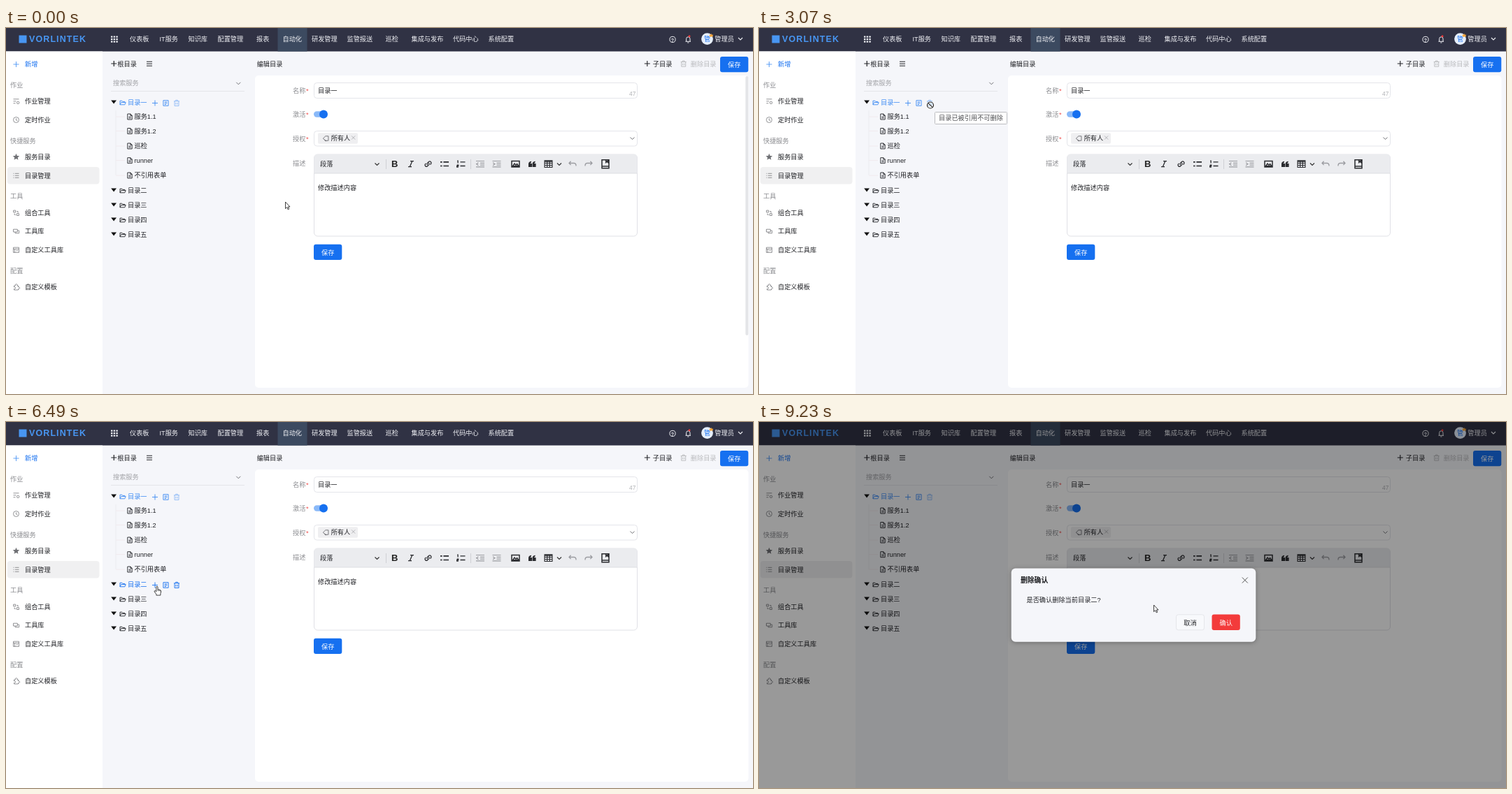
An HTML page for the animation above (9.31 s loop, 1068x524 px).

```html
<!DOCTYPE html>
<html lang="zh-CN">
<head>
<meta charset="utf-8">
<title>目录管理</title>
<style>
  html, body { margin: 0; width: 100%; height: 100%; overflow: hidden; background: #f5f6fa; }
  svg { display: block; width: 100%; height: 100%; }
  text { font: 9.2px 'Liberation Sans', 'Noto Sans CJK SC', 'Noto Sans CJK', sans-serif; fill: currentColor; }
</style>
</head>
<body>
<svg id="stage" viewBox="0 0 1068 524" xmlns="http://www.w3.org/2000/svg"></svg>
<script>
const LOOP = 9310, STEP = 76;
const BLUE = '#1670f0', INK = '#212226', GREY = '#8b8c90', PALE = '#b9babd';

// ---------- drawing helpers (all return markup) ----------
const text = (x, cy, s, color = 'currentColor', more = '') =>
  `<text x="${x}" y="${cy + 3.4}" style="fill:${color};${more}">${s}</text>`;
const rect = (x, y, w, h, fill, r = 0, stroke = 'none') =>
  `<rect x="${x}" y="${y}" width="${w}" height="${h}" rx="${r}" fill="${fill}" stroke="${stroke}"/>`;
const circle = (x, y, r, fill) => `<circle cx="${x}" cy="${y}" r="${r}" fill="${fill}"/>`;
const line = (d, color = 'currentColor', w = 1) =>
  `<path d="${d}" fill="none" stroke="${color}" stroke-width="${w}"/>`;
const icon = (name, x, y, color = 'currentColor', w = .9) =>
  `<g transform="translate(${x} ${y})">${line(ICONS[name], color, w)}</g>`;
const button = (x, y, w, h, label, fill, color = '#fff', stroke) =>
  rect(x, y, w, h, fill, 3, stroke) + text(x + w / 2, y + h / 2 + .4, label, color, 'text-anchor:middle');

// every icon is centred on 0,0
const ICONS = {
  plus: 'M-4 0H4M0-4V4',
  chevron: 'M-3-1.5L0 1.5L3-1.5',
  cross: 'M-4-4L4 4M4-4L-4 4',
  menu: 'M-4-3H4M-4 0H4M-4 3H4',
  trash: 'M-4-2.7H4M-1.4-2.7V-4.2H1.4V-2.7M-3-2.7V4H3V-2.7M-1.1-.6V2.2M1.1-.6V2.2',
  edit: 'M-3.6-3.8H3.6V3.8H-3.6ZM-1.8-1.6H1.8M-1.8 .2H1.8M-1.8 2H.6',
  folder: 'M-4 2.8V-2.8H-1.2L-.2-1.6H2.8V-.4M-4 2.8L-2.4-.4H4.2L2.8 2.8Z',
  file: 'M-3.2-4H1L3.2-1.8V4H-3.2ZM.8-4V-1.6H3.2M-1.5 .2H1.6M-1.5 2H1.6',
  job: 'M-4-3.2H4M-4-.2H0M-4 2.8H-1M1 1.9A1.7 1.7 0 1 0 4.4 1.9A1.7 1.7 0 1 0 1 1.9',
  clock: 'M-4 0A4 4 0 1 0 4 0A4 4 0 1 0-4 0M0-2.2V.4L1.8 1.4',
  list: 'M-4-3H-3M-1.6-3H4M-4 0H-3M-1.6 0H4M-4 3H-3M-1.6 3H4',
  combo: 'M-3.8-3.6H-.8V-.8H-3.8ZM1 1H4V3.8H1ZM.8-2.2H2.6V0M-2.4 .8V2.6H-.4',
  stack: 'M-4-2.8H1.8V1H-4ZM-1.4 1V2.8H4.2V-1H1.8',
  custom: 'M-4-3.6H4V3.6H-4ZM-4-1.4H4M-2-1.4V3.6M0 1H2.6',
  puzzle: 'M-3-2H-1A1.5 1.5 0 1 1 1.4-2H3V0A1.4 1.4 0 1 1 3 2.4V4H-3V2.4A1.4 1.4 0 1 0-3 0Z',
  tag: 'M-4 .2L-.5-3.2H3.6V3.2H-.5ZM-1.5 1.8L-1 3.6H1',
  italic: 'M-1-4H4M-4 4H1M1.7-4L-1.7 4',
  link: 'M-.8 1.6A2.2 2.2 0 0 1-.8-1.4L1.2-3.4A2.2 2.2 0 0 1 4.2-.4L3 .8M.8-1.6A2.2 2.2 0 0 1 .8 1.4L-1.2 3.4A2.2 2.2 0 0 1-4.2 .4L-3-.8',
  bullets: 'M-6-2.8H-3.4M-1.6-2.8H6M-6 2.8H-3.4M-1.6 2.8H6',
  numbers: 'M-5.4-4.6H-4.4V-1.2M-5.8 1.4H-3.8V2.8H-5.8V4.4H-3.6M-1-2.8H6M-1 2.8H6',
  outdent: 'M-6-4.2H6M0-1.4H6M0 1.4H6M-6 4.2H6M-2.6-2L-5.4 0L-2.6 2',
  indent: 'M-6-4.2H6M0-1.4H6M0 1.4H6M-6 4.2H6M-5.4-2L-2.6 0L-5.4 2',
  image: 'M-5.5-4.2H5.5V4.2H-5.5ZM-4 3L-1.5-.5L.6 1.6L2.2 0L4.4 3Z',
  table: 'M-5.4-4.8H5.4V4.8H-5.4ZM-5.4-3.6H5.4M-5.4-1.2H5.4M-5.4 1.8H5.4M-1.8-3.6V4.8M1.8-3.6V4.8',
  undo: 'M-2.4-4L-5-1.2L-2.4 1.4M-5-1.2H2.2Q5.2-1 5 2.8',
  redo: 'M2.4-4L5-1.2L2.4 1.4M5-1.2H-2.2Q-5.2-1-5 2.8',
  book: 'M-5-6H5V6H-5ZM-5 3.4H5M.8-6V-2.4L2.2-3.6L3.6-2.4V-6'
};

// ---------- page parts ----------
function header() {
  const tabs = [['仪表板', 177], ['IT服务', 219.5], ['知识库', 260.5], ['配置管理', 302.5], ['报表', 358],
    ['自动化', 395.5], ['研发管理', 437], ['监管报送', 487.5], ['巡检', 542.5], ['集成与发布', 579.5],
    ['代码中心', 639], ['系统配置', 689.5]];
  let out = rect(0, 0, 1068, 33.5, '#303244') + rect(388.5, 0, 42, 33.5, '#3c4a60');
  out += rect(18.5, 10.5, 11, 11, '#4896f2') +
    text(33, 16.9, 'VORLINTEK', '#4896f2', 'font-size:12.5px;font-weight:700;letter-spacing:1.1px');
  for (let i = 0; i < 9; i++)
    out += rect(150 + i % 3 * 3.7, 11.5 + Math.floor(i / 3) * 3.5, 2.4, 2.2, '#eef0f4');
  out += tabs.map(([s, x]) => text(x, 16, s, '#f0f1f5')).join('');
  out += icon('clock', 953, 16.3, 'none') +
    `<circle cx="953" cy="16.4" r="4.1" fill="none" stroke="#f0f1f5"/>` +
    text(953, 16.3, '?', '#f0f1f5', 'text-anchor:middle;font-size:7px;font-weight:700') +
    line('M971.5 19.3H979M972.6 19V15.5A2.7 2.7 0 0 1 978 15.5V19M974.3 21H976.3', '#f0f1f5') +
    circle(977, 11.8, 1.5, '#f33b3b') +
    circle(1002.5, 15.6, 8.4, '#e6effc') +
    text(1002.5, 15.8, '管', BLUE, 'text-anchor:middle;font-size:9px') +
    `<path d="M1005.5 9L1007 10L1008.3 8L1009.6 10L1011 9.2L1010.4 12.4H1006Z" fill="#f4a63a"/>` +
    text(1013.3, 16, '管理员', '#f0f1f5') + icon('chevron', 1050, 15.5, '#f0f1f5', 1.1);
  return out;
}

function sidebar() {
  const groups = [['作业', 82], ['快捷服务', 161.5], ['工具', 241], ['配置', 347.5]];
  const items = [['job', '作业管理', 105], ['clock', '定时作业', 131.5], ['', '服务目录', 184.5],
    ['list', '目录管理', 211.3], ['combo', '组合工具', 264.7], ['stack', '工具库', 291],
    ['custom', '自定义工具库', 317.8], ['puzzle', '自定义模板', 371]];
  const star = Array.from({ length: 10 }, (_, i) => {
    const r = i % 2 ? 2.3 : 5, a = i * Math.PI / 5;
    return `${14.5 + r * Math.sin(a)},${184.8 - r * Math.cos(a)}`;
  }).join(' ');
  return rect(0, 33.5, 138, 491, '#fff') + rect(2, 199, 131.5, 24.5, '#f0f0f1', 4) +
    icon('plus', 14.5, 52, '#4e97f5') + text(27, 52, '新增', BLUE) +
    groups.map(([s, y]) => text(6, y, s, GREY)).join('') +
    items.map(([k, s, y]) => (k ? icon(k, 14.5, y, '#77787c', .8) : '') + text(27, y, s, INK)).join('') +
    `<polygon points="${star}" fill="#6f7074"/>`;
}

const ROWS = [['目录一', 107], ['服务1.1', 127, 1], ['服务1.2', 147.5, 1], ['巡检', 169, 1], ['runner', 189.7, 1],
  ['不引用表单', 211, 1], ['目录二', 233], ['目录三', 254], ['目录四', 275], ['目录五', 296]];

function tree() {
  let out = icon('plus', 154.3, 51, INK, 1.2) + text(159.3, 51.2, '根目录', INK) + icon('menu', 205, 51.2, INK, 1) +
    text(153, 78.3, '搜索服务', '#a3a4a8') + icon('chevron', 332.3, 79.3, '#66676b') +
    line('M150 90.5H341', '#e4e5ea') + line('M157 118V211', '#ebecf0');
  ROWS.forEach(([s, y, leaf], i) => {
    const acts = leaf ? '' : icon('plus', 213, y + .5) + icon('edit', 228.5, y + .5) +
      `<g opacity="${i ? 1 : .55}">${icon('trash', 244, y + .5)}</g>`;
    out += leaf ? line(`M157 ${y}H170`, '#f1eaee')
      : `<path d="M150.2 ${y - 3.6}H158L154.1 ${y + 1.6}Z" fill="#111"/>`;
    out += `<g class="row">${icon(leaf ? 'file' : 'folder', leaf ? 177 : 167, y)}` +
      text(leaf ? 183.5 : 174, y, s) + `<g class="acts">${acts}</g></g>`;
  });
  return out;
}

function form() {
  const labels = [['名称', 89.3], ['激活', 123.8], ['授权', 158.3], ['描述', 193.3]];
  const tools = [['italic', 579, 1.3], ['link', 603.5, 1.3], ['bullets', 627, 1.7], ['numbers', 650.5, 1.3],
    ['outdent', 678, 1.2, 1], ['indent', 701.5, 1.2, 1], ['image', 728.5, 1.5], ['table', 775.5, 1.2],
    ['undo', 810, 1.3, 1], ['redo', 833, 1.3, 1], ['book', 857, 1.5]];
  let out = text(358.7, 52, '编辑目录', INK) + icon('plus', 916.8, 51, INK, 1.1) + text(924.8, 51.2, '子目录', INK) +
    icon('trash', 968.7, 51.2, PALE) + text(978.8, 51.2, '删除目录', PALE) +
    button(1021, 41, 40.3, 22.3, '保存', BLUE) + rect(356, 68, 705.5, 447, '#fff', 5);
  labels.forEach(([s, y], i) => {
    out += text(410, y, s, GREY) + (i < 3 ? text(429, y, '*', '#f0504e') : '');
  });
  out += rect(440.5, 78.5, 462, 22, '#fff', 4, '#e4e5ea') + text(446, 89.5, '目录一', INK) +
    text(891, 93.5, '47', '#b0b1b5', 'font-size:8.4px') +
    rect(440, 119.3, 17.5, 8.4, '#8ab9f8', 4.2) + circle(454, 123.4, 6, BLUE) +
    rect(440.5, 147.5, 462, 21.5, '#fff', 4, '#e4e5ea') + rect(446, 150.2, 57, 15.6, '#efeff1', 2) +
    icon('tag', 457.3, 158, '#5a5b60', .8) + text(464.7, 157.8, '所有人', INK) +
    `<g transform="translate(496.6 157) scale(.65)">${line(ICONS.cross, '#97989c', 1)}</g>` +
    icon('chevron', 895.5, 158, '#66676b');
  out += rect(440.5, 181, 462, 117, '#fff', 5, '#e0e1e6') +
    `<path d="M440.5 208V186Q440.5 181 445.5 181H897.5Q902.5 181 902.5 186V208Z" fill="#ebecef"/>` +
    line('M440.5 208H902.5', '#dcdde2') + text(449, 194.5, '段落', INK) +
    icon('chevron', 530.5, 195, '#333', 1.2) + icon('chevron', 791, 195, '#333', 1.2) +
    line('M543.5 188V202M664.5 188V202', '#cfd0d5') +
    text(555.8, 195.3, 'B', '#222', 'font-size:13px;font-weight:700;text-anchor:middle') +
    tools.map(([k, x, w, off]) => icon(k, x, 194.7, off ? '#9b9ca1' : '#2a2b2f', w)).join('');
  for (const x of [747, 752.6])
    out += `<path d="M${x} 194.6Q${x} 191.4 ${x + 4} 190.7V192.4Q${x + 2.6} 193 ${x + 2.5} 194H${x + 5}V199H${x}Z" fill="#2a2b2f"/>`;
  return out + text(446, 228.3, '修改描述内容', INK) + button(440, 309.7, 40.3, 22.3, '保存', BLUE);
}

function dialog() {
  return rect(0, 0, 1068, 524, 'rgba(0,0,0,.4)') +
    `<g style="filter:drop-shadow(0 1px 3px rgba(0,0,0,.3))">${rect(360.7, 209.5, 349.6, 105.3, '#f5f6fa', 6)}</g>` +
    text(374, 227, '删除确认', '#17181b', 'font-size:9.8px;font-weight:700') +
    icon('cross', 694.8, 226.5, '#444', .9) + text(382.5, 255, '是否确认删除当前目录二?', INK) +
    button(596.5, 275.8, 40, 22, '取消', '#f8f9fc', INK, '#e5e6ea') + button(647.5, 275.5, 40.3, 22.5, '确认', '#f33b3b');
}

const tip = (id, x, y, w, s) => `<g id="${id}">${rect(x + .5, y + .5, w - 1, 17, '#fff', 1, '#bcbdc0')}` +
  text(x + w / 2, y + 9, s, '#4c4d50', 'text-anchor:middle') + '</g>';

const pointer = (id, d, extra = '') =>
  `<g id="${id}"><path d="${d}" fill="#fff" stroke="#111" stroke-width=".8" stroke-linejoin="round"/>${extra}</g>`;

const ban = `M-3.2-3.2L3.2 3.2M-4.5 0A4.5 4.5 0 1 0 4.5 0A4.5 4.5 0 1 0-4.5 0`;

const $ = id => document.getElementById(id);
$('stage').innerHTML = rect(0, 0, 1068, 524, '#f5f6fa') + header() + sidebar() + tree() + form() +
  `<g id="scroll">${rect(1057.3, 69, 4, 371, '#e4e5e8', 2)}</g>` +
  tip('tipUsed', 251, 120, 104, '目录已被引用不可删除') + tip('tipDelete', 249, 247, 29, '删除') +
  `<g id="click" opacity=".65">${circle(243, 236.7, 8.3, '#f6ec12')}</g><g id="modal">${dialog()}</g><g id="cursor">` +
  pointer('arrow', 'M.5 0V9.6L2.7 7.6L4.2 10.9L5.7 10.2L4.2 7H7Z') +
  pointer('hand', 'M-1.1 1Q0-.6 1.1 1V4.6L4.6 5.5Q6 6 5.8 7.8L5 10.8V13H-1V11.4L-3.8 7.8Q-4 6.2-2.4 6.7L-1.1 7.9Z',
    line('M1.1 4.6V7M2.9 5.2V7.2M4.5 5.6V7.4', '#111', .6)) +
  `<g id="ban">${line(ban, '#fff', 2.6)}${line(ban, '#222', 1.2)}</g></g>`;

const rows = [...document.querySelectorAll('.row')];
rows.forEach((row, i) => {
  const [, y, leaf] = ROWS[i];
  if (!leaf) return;
  const label = row.querySelector('text');
  row.querySelector('.acts').innerHTML = icon('trash', 183.5 + label.getComputedTextLength() + 12, y + .5);
});

// ---------- motion ----------
const EASE = { io: p => p * p * (3 - 2 * p), in: p => p * p, out: p => p * (2 - p), lin: p => p };
// first step, last step, step count, end x, end y, easing
const MOVES = [
  [810, 1730, 13, 250.5, 119, 'io'],
  [1810, 2140, 5, 246, 110, 'io'],
  [2450, 2520, 2, 245, 110.5, 'lin'],
  [4550, 4550, 1, 243.8, 112, 'lin'],
  [4627, 5470, 12, 224, 196, 'in'],
  [5550, 5550, 1, 216.5, 206, 'lin'],
  [5628, 6020, 6, 201, 234, 'out'],
  [6410, 6710, 5, 243.3, 237, 'io'],
  [8620, 8690, 2, 247, 235, 'lin'],
  [9000, 9000, 1, 262, 234, 'lin'],
  [9080, 9150, 2, 699, 310, 'lin'],
  [9230, 9230, 1, 564, 262, 'lin']
];

function cursorAt(t) {
  let x = 399, y = 249;
  for (const [from, to, n, ex, ey, ease] of MOVES) {
    if (t < from) break;
    const gap = n > 1 ? (to - from) / (n - 1) : 1;
    const done = Math.min(n, Math.floor((t - from) / gap + 1e-6) + 1);
    const k = EASE[ease](done / n);
    x += (ex - x) * k;
    y += (ey - y) * k;
  }
  return [x, y];
}

function hoverAt(t) {
  if (t < 0 || t >= 7900) return -1;
  const [x, y] = cursorAt(t);
  return x > 145 && x < 345 ? ROWS.findIndex(r => Math.abs(y - r[1]) <= 10.5) : -1;
}

const show = (el, on) => { el.style.display = on ? '' : 'none'; };
const within = (t, a, b) => t >= a && t < b;

function draw(t) {
  const [x, y] = cursorAt(t);
  const hover = hoverAt(t), tinted = hoverAt(t - STEP), modal = t >= 7900;
  rows.forEach((row, i) => {
    row.style.color = i === 0 ? '#3d8bf3' : i === tinted ? BLUE : INK;
    show(row.lastElementChild, i === 0 || i === hover);
  });
  const banned = hover === 0 && x > 240 && x < 249 && y < 111.7;
  show($('ban'), banned);
  show($('hand'), hover >= 0 && !banned);
  show($('arrow'), hover < 0);
  $('cursor').setAttribute('transform', `translate(${x} ${y})`);
  show($('scroll'), x > 356 && !modal);
  show($('tipUsed'), within(t, 3070, 4550));
  show($('tipDelete'), within(t, 7260, 7740));
  show($('click'), within(t, 7740, 7900));
  show($('modal'), modal);
}

const start = performance.now();
function tick() {
  draw((performance.now() - start) % LOOP);
  requestAnimationFrame(tick);
}
tick();
</script>
</body>
</html>
```
